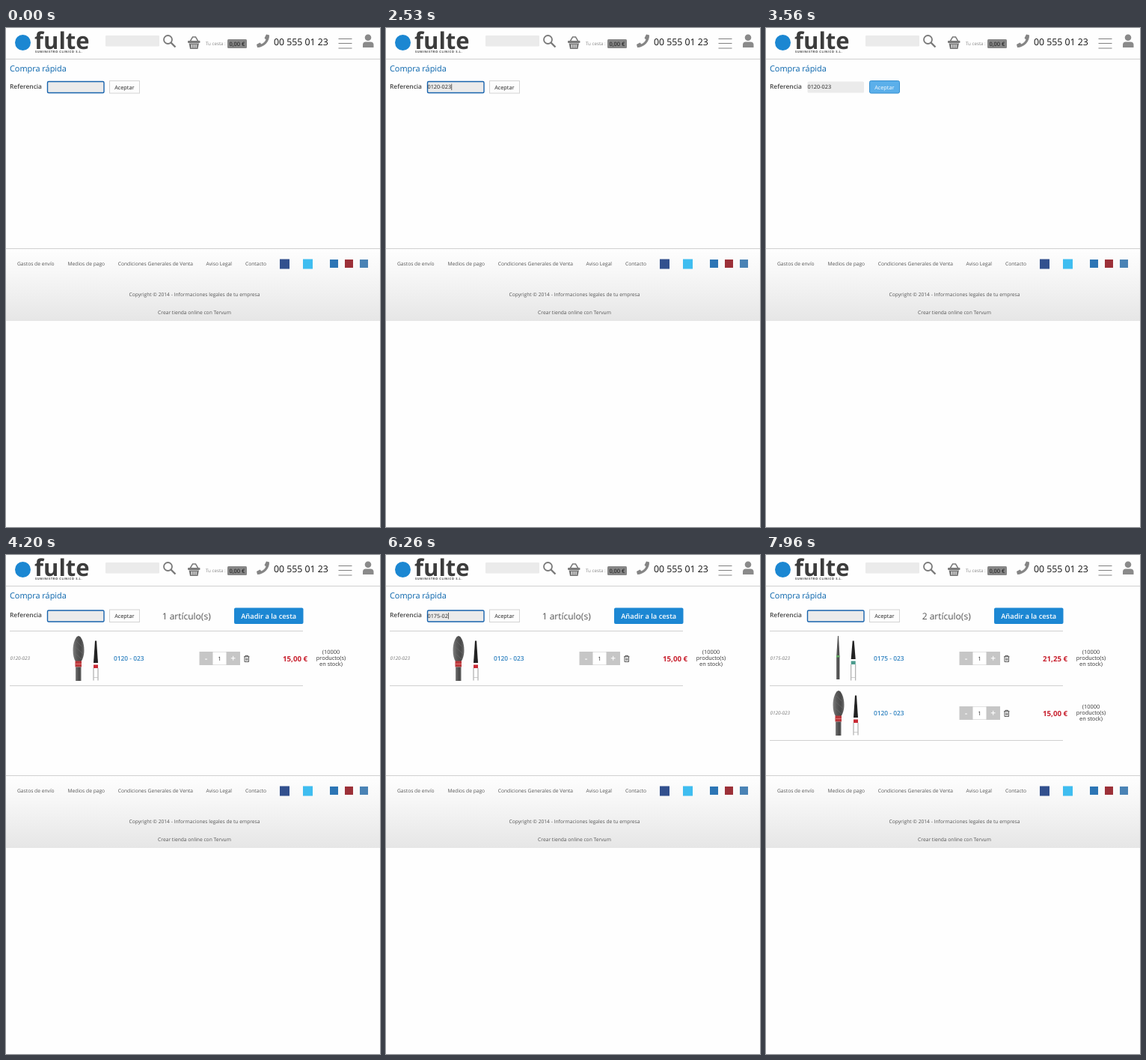
These frames come from a looping animation (500 px wide and 666 px high, 8 s). An HTML page:

```html
<!DOCTYPE html>
<html lang="es">
<head>
<meta charset="utf-8">
<title>Compra rápida</title>
<style>
html, body { margin: 0; width: 100%; height: 100%; overflow: hidden; background: #fefefe; }
svg { display: block; width: 100%; height: 100%; font-family: "Open Sans", "Noto Sans", sans-serif; }
text { white-space: pre; text-rendering: geometricPrecision; }
</style>
</head>
<body>
<svg id="stage" viewBox="0 0 500 666"></svg>
<script>
const LOOP = 8000;
const KEY_GAP = 250;
const CARET = 530;
const FADE = 150;

// Each order: first key press, hover, click, moment the result appears
const ORDERS = [
  { ref: "0120-023", type: 700, hover: 3175, click: 3450, done: 4050 },
  { ref: "0175-023", type: 4700, hover: 6900, click: 7150, done: 7800 }
];

const rect = (x, y, w, h, fill, extra = "") =>
  `<rect x="${x}" y="${y}" width="${w}" height="${h}" fill="${fill}" ${extra}/>`;
const path = (d, fill, extra = "") => `<path d="${d}" fill="${fill}" ${extra}/>`;
const stroke = (d, color, width, extra = "") =>
  path(d, "none", `stroke="${color}" stroke-width="${width}" ${extra}`);
const text = (x, y, size, fill, str, extra = "") =>
  `<text x="${x}" y="${y}" font-size="${size}" fill="${fill}" ${extra}>${str}</text>`;
const MID = 'text-anchor="middle"';
const SEMI = 'font-weight="600"';
const RULE = "#d0d0d0";

const defs = `<defs>
  <linearGradient id="shade" x2="0" y2="1">
    <stop stop-color="#fefefe"/><stop offset=".3" stop-color="#f8f8f8"/><stop offset="1" stop-color="#e6e6e6"/>
  </linearGradient>
  <linearGradient id="steel">
    <stop stop-color="#808080"/><stop offset=".3" stop-color="#5c5c5c"/>
    <stop offset=".7" stop-color="#484848"/><stop offset="1" stop-color="#6c6c6c"/>
  </linearGradient>
</defs>`;

function header() {
  const gray = "#7a7a7a";
  return `<circle cx="22.500" cy="19.500" r="10.500" fill="#1b87d2"/>`
    + text(38, 27.7, 31, "#3c3c3c", "fulte", 'font-weight="700"')
    + text(39, 33.3, 4, "#444", "SUMINISTRO CLINICO S.L.", 'font-weight="700" letter-spacing=".55"')
    + rect(133, 10, 72, 14.5, "#ebebeb", 'rx="1"')
    + `<circle cx="216.500" cy="15.500" r="5.500" fill="none" stroke="${gray}" stroke-width="1.800"/>`
    + stroke("M220.500 19.500L226.500 25.500", gray, 2.4)
    + stroke("M246 18L249.500 12H253.500L257 18", gray, 1.5)
    + rect(243, 17, 16.5, 3, gray, 'rx="1"')
    + path("M244.500 20.500H258L256.500 28H246Z", gray)
    + stroke("M248.500 22V26.500M251.300 22V26.500M254 22V26.500", "#fff", 1.1)
    + text(267, 23.2, 6.2, "#888", "Tu cesta :")
    + rect(296, 15, 26, 12, "#868686", 'rx="1.500"')
    + text(298.5, 23.6, 7.4, "#111", "0,00 €")
    + path("M348 8.500L352 9.500C352.500 18 345 26 336 26L335 22L339.500 19.500L341.500 21.500C344.500 20 346 18.500 347.500 15.500L345.500 13.500Z", "#858585")
    + text(358, 23.3, 12.3, "#111", "00 555 01 23")
    + stroke("M444.500 14.500H462.500M444.500 20.500H462.500M444.500 27H462.500", "#808080", 1.2)
    + `<circle cx="484" cy="12.800" r="4.300" fill="#8a8a8a"/>`
    + path("M477 26V22.500Q477 18.500 481 18.500H487Q491.500 18.500 491.500 22.500V26Z", "#8a8a8a")
    + rect(0, 41, 500, 1, RULE)
    + text(5, 57.8, 10.9, "#0663ab", "Compra rápida");
}

function footer() {
  const links = [[15, "Gastos de envío"], [82.5, "Medios de pago"],
    [149.7, "Condiciones Generales de Venta"], [267.5, "Aviso Legal"], [320, "Contacto"]];
  return rect(0, 294, 500, 97, "url(#shade)")
    + rect(0, 294, 500, 1, RULE)
    + links.map(([x, label]) => text(x, 316.7, 6.7, "#555", label)).join("")
    + rect(366, 308.5, 13, 13, "#32508e")
    + rect(397, 308.5, 13, 13, "#3fbdf0")
    + rect(433, 309, 11, 11, "#2c75b5")
    + rect(453, 309, 11, 11, "#9c3038")
    + rect(473, 309, 11, 11, "#4a83b5")
    + text(252, 357.7, 6.7, "#555", "Copyright © 2014 - Informaciones legales de tu empresa", MID)
    + text(252, 381.8, 6.7, "#555", "Crear tienda online con Tervum", MID);
}

// Slim black tip with a colour band and a white shank, centred on x
function thinTool(x, color, bottom) {
  return `<g transform="translate(${x} 0)">`
    + path(`M-1 13.500H1L3 ${bottom}H-3Z`, "#222")
    + rect(-3, bottom + 2.5, 6, 4.5, color)
    + stroke(`M-3 ${bottom + 7}V66.500M3 ${bottom + 7}V66.500`, "#777", 0.7)
    + stroke("M-3 62.500H3", "#bbb", 0.7)
    + `</g>`;
}

function ovalTool() {
  return path("M97 7C100.500 7 104.500 16 104.500 26C104.500 33 102.500 38 100.500 41H93C91 38 89.500 33 89.500 26C89.500 16 93.500 7 97 7Z", "url(#steel)")
    + stroke("M94 14L101 21M92 21L103 31M91 29L101 38", "#6c6c6c", 0.7)
    + rect(92.5, 40.5, 8.5, 8, "#b9373b")
    + stroke("M92.500 44.500H101", "#dd7777", 1)
    + rect(93, 48.5, 7.5, 18.5, "url(#steel)")
    + thinTool(120, "#c92a35", 43);
}

function needleTool() {
  return path("M96 7H97L98.500 35V65H94V35Z", "url(#steel)")
    + rect(94, 33, 4.5, 2.5, "#63ad63")
    + thinTool(116.7, "#4b9b8d", 38);
}

function row(ref, price, tool) {
  return rect(5, 73, 392, 1, RULE)
    + text(5.5, 39, 6.4, "#777", ref, 'font-style="italic"')
    + tool
    + text(144, 40, 8.4, "#2f82c0", ref.replace("-", " - "), SEMI)
    + rect(258.5, 28, 54.5, 18, "#c6c6c6")
    + rect(276.5, 28.5, 18, 17, "#fff")
    + text(267.5, 41, 11, "#fff", "-", MID + " " + SEMI)
    + text(285.5, 39.6, 7.3, "#222", "1", MID)
    + text(303.7, 41.4, 12, "#fff", "+", MID + " " + SEMI)
    + stroke("M318 34.700H325.500M320 34.500V33.300H323.500V34.500M319 35V41.500H324.500V35M321 36.500V40M322.700 36.500V40", "#333", 0.8)
    + text(403, 40.7, 9.7, "#c81f2d", price, 'text-anchor="end" font-weight="700"')
    + ["(10000", "producto(s)", "en stock)"].map((s, i) =>
        text(434.5, 30.6 + i * 8.3, 7.4, "#333", s, MID)).join("");
}

const stage = document.getElementById("stage");
stage.innerHTML = defs + header() + footer()
  + `<g id="form">`
  + text(5, 80.5, 8.4, "#444", "Referencia", SEMI)
  + `<rect id="field" x="55.500" y="71.500" width="75.500" height="15" rx="1.500" fill="#ebebeb" stroke-width="1.400"/>`
  + text(55.5, 81.4, 7.3, "#222", "", 'id="typed"')
  + `<rect id="caret" y="74.500" width=".8" height="8.500" fill="#444"/>`
  + `<rect id="button" x="138.500" y="70.500" width="40" height="16.500"/>`
  + text(158.3, 81.6, 7.3, "#222", "Aceptar", MID + ' id="label"')
  + `</g><g id="results">`
  + text(208.7, 85.5, 12, "#555", "", 'id="count"')
  + rect(305, 70.5, 92.5, 21.5, "#1c87d3", 'rx="2"')
  + text(351.2, 84.7, 9.3, "#fff", "Añadir a la cesta", MID + " " + SEMI)
  + rect(5, 101, 392, 1, RULE)
  + `<g id="row0">${row("0120-023", "15,00 €", ovalTool())}</g>`
  + `<g id="row1" transform="translate(0 101)">${row("0175-023", "21,25 €", needleTool())}</g></g>`;

const el = {};
stage.querySelectorAll("[id]").forEach(n => el[n.id] = n);
const set = (node, attrs) => {
  for (const k in attrs) node.setAttribute(k, attrs[k]);
};
const show = (node, on) => node.setAttribute("visibility", on ? "visible" : "hidden");
const clamp = v => Math.max(0, Math.min(1, v));
const mix = (a, b, p) => `rgb(${a.map((v, i) => Math.round(v + (b[i] - v) * p))})`;

const BLUE = [91, 175, 234], PLAIN = [252, 252, 252], EDGE = [212, 212, 212];
const INK = [34, 34, 34], WHITE = [255, 255, 255];

function draw(t) {
  const done = ORDERS.filter(o => t >= o.done).length;
  const order = ORDERS[done];
  let typed = "", hover = 0, clicked = false, caretOn = false;

  if (order) {
    const since = t - order.type;
    const keys = since < 0 ? 0 : Math.min(order.ref.length, Math.floor(since / KEY_GAP) + 1);
    const idle = since - (keys - 1) * KEY_GAP;
    typed = order.ref.slice(0, keys);
    hover = clamp((t - order.hover) / FADE);
    clicked = t >= order.click;
    caretOn = keys > 0 && !clicked && idle % (2 * CARET) < CARET;
  }

  set(el.form, { transform: `translate(0 ${done ? 2.5 : 0})` });
  set(el.field, { stroke: clicked ? "none" : "#1763ad" });
  el.typed.textContent = typed;
  show(el.caret, caretOn);
  if (caretOn) set(el.caret, { x: 55.8 + el.typed.getComputedTextLength() });

  set(el.button, {
    fill: mix(PLAIN, BLUE, hover),
    stroke: clicked ? "#348fd0" : mix(EDGE, BLUE, hover),
    rx: clicked ? 2 : 0
  });
  set(el.label, { fill: mix(INK, WHITE, hover) });

  el.count.textContent = `${done} artículo(s)`;
  set(el.results, { display: done ? "inline" : "none" });
  set(el.row0, { transform: `translate(0 ${done > 1 ? 174 : 101})` });
  show(el.row1, done > 1);
}

function tick(now) {
  draw(now % LOOP);
  requestAnimationFrame(tick);
}
draw(0);
requestAnimationFrame(tick);
</script>
</body>
</html>
```
